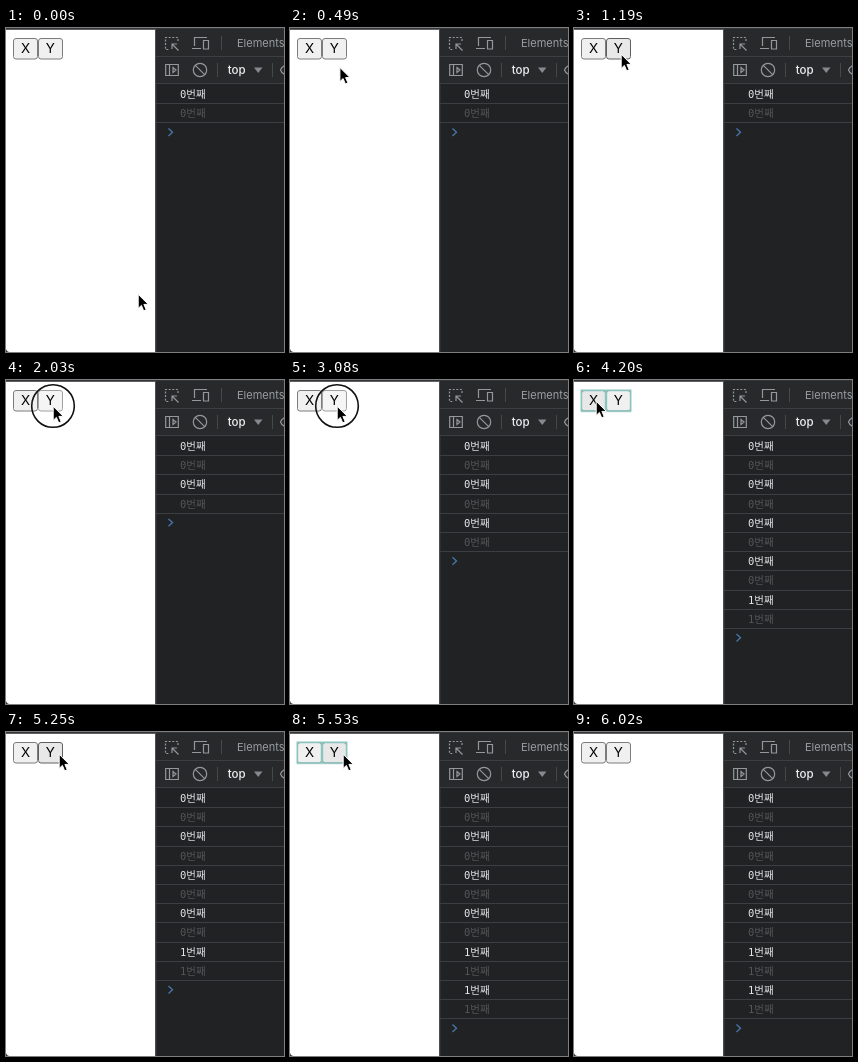
An HTML page that plays this animation: 278 px wide and 324 px high, repeating every 7 s.

```html
<!DOCTYPE html>
<html lang="ko">
<head>
<meta charset="utf-8">
<title>Render log</title>
<style>
html, body { margin: 0; width: 100%; height: 100%; overflow: hidden; background: #202224; }
svg { display: block; width: 278px; height: 324px; }
.ui { font: 11px Inter, Roboto, sans-serif; }
.btn rect { fill: #f0f0f0; stroke: #7c7c7c; }
.btn text { font: 13.4px Inter, Arial, sans-serif; text-anchor: middle; fill: #000; }
.btn.hover rect { fill: #e8e8e8; stroke: #606060; }
.btn.active rect { fill: #f5f5f5; stroke: #a0a0a0; }
.log { font: 10.5px "DejaVu Sans Mono", "Noto Sans CJK KR", "Noto Sans CJK", monospace; fill: #e4e6e8; }
.dim { fill: #535557; }
.line { stroke: #3c3f42; }
.icon { fill: none; stroke: #94989c; stroke-width: 1.2; }
</style>
</head>
<body>
<svg viewBox="0 0 278 324">
  <rect width="278" height="324" fill="#202224"/>
  <rect y="1.5" width="149" height="322.5" fill="#fff"/>
  <rect width="278" height="1.5" fill="#333437"/>
  <path d="M0 321V324H3Q0.5 323.5 0 321Z" fill="#333"/>
  <rect x="149" y="1" width="1.3" height="323" fill="#4a4c4e"/>

  <rect x="150.3" y="1.5" width="128" height="54" fill="#27292b"/>
  <path class="line" d="M150 28.5H278M150 55.5H278"/>
  <path stroke="#46494c" d="M215.5 8V22M211.5 35V49M266.5 35V49"/>
  <path class="icon" stroke-dasharray="2 1.6" d="M172 13V9.5H159.5V21.5H164"/>
  <path class="icon" d="M172.5 22.5L166 16M166 21V16H171"/>
  <path class="icon" d="M188.5 18V9.5H201M186 20.5H195M197.5 12.5H202.5V21H197.5Z"/>
  <text class="ui" x="231" y="19.3" fill="#9a9ea2">Elements</text>
  <path class="icon" d="M159.7 36.5H172.3V47.5H159.7ZM163.5 36.5V47.5M167 39.5L170 42L167 44.5Z"/>
  <circle class="icon" cx="194" cy="42" r="6.7"/>
  <path class="icon" d="M189.3 37.3L198.7 46.7"/>
  <text class="ui" x="221.7" y="46" fill="#eceef0" style="font-size:11.5px;font-weight:500">top</text>
  <path d="M248 39.5H256.5L252.2 45Z" fill="#85898d"/>
  <path class="icon" d="M279 37.5Q275.5 39 274.5 42Q275.5 45 279 46.5"/>

  <g id="logs"></g>
  <path id="prompt" d="M162.5 -3.7L166.5 0L162.5 3.7" fill="none" stroke="#4877ad" stroke-width="1.3"/>

  <g class="btn" id="bx"><rect x="7.5" y="10.5" width="24" height="20.5" rx="2.5"/><text x="19.5" y="25.3">X</text></g>
  <g class="btn" id="by"><rect x="32.5" y="10.5" width="24" height="20.5" rx="2.5"/><text x="44.3" y="25.3">Y</text></g>
  <g id="flash" fill="none">
    <path stroke="#d9ebe9" d="M6.5 9.5H57.5V32H6.5Z"/>
    <path stroke="#8cc5bf" stroke-width="1.4" d="M7.5 10.5H31.5V31H7.5ZM32.5 10.5H56.5V31H32.5Z"/>
  </g>
  <g id="cursor">
    <circle id="ring" r="21.3" fill="none" stroke="#111" stroke-width="1.6"/>
    <path d="M.2 .3V14.4L3.4 11.4L5.7 16.8L8.2 15.7L5.9 10.4H10.3Z" fill="#000" stroke="#fff" stroke-width="1" stroke-linejoin="round"/>
  </g>
</svg>
<script>
const LOOP = 7000, STEP = 70, ROW = 19.2, TOP = 56;
const $ = id => document.getElementById(id);

// time, x, y of the pointer tip
const path = [
  [0, 132, 266], [560, 46, 29], [1120, 46, 29], [1190, 47, 26],
  [3360, 47, 26], [3570, 37, 23], [3710, 37, 23], [3850, 22, 21],
  [4830, 22, 21], [5040, 54, 25], [5180, 54, 25], [5250, 53, 22],
  [5880, 53, 22], [5950, 78, 52]
];
// press time, release time, logged count (none for the focusing click)
const clicks = [
  [630, 770, null], [1260, 1470, 0], [2030, 2170, 0],
  [3080, 3290, 0], [4060, 4200, 1], [5320, 5530, 1]
];
const renders = [[0, 0, 0], ...clicks.filter(c => c[2] !== null)];
const FLASH = 280, HOVER_ON = 980, HOVER_OFF = 5950, LEAVE = 6020;

const pairs = renders.map(([, , count], i) => {
  let html = "";
  for (let k = 0; k < 2; k++) {
    const y = TOP + (2 * i + k) * ROW;
    const edge = Math.round(y + ROW) + 0.5;
    html += `<text class="log${k ? " dim" : ""}" x="174" y="${y + 13.9}">${count}번째</text>` +
            `<path class="line" d="M150 ${edge}H278"/>`;
  }
  const g = document.createElementNS("http://www.w3.org/2000/svg", "g");
  g.innerHTML = html;
  $("logs").append(g);
  return g;
});

function pointAt(t) {
  const i = path.findIndex(p => p[0] > t);
  if (i < 0) return path[path.length - 1].slice(1);
  const [t0, x0, y0] = path[i - 1], [t1, x1, y1] = path[i];
  const p = (t - t0) / (t1 - t0), e = p * p * (3 - 2 * p);
  return [x0 + (x1 - x0) * e, y0 + (y1 - y0) * e];
}

const show = (el, on) => { el.style.display = on ? "" : "none"; };

function draw(now) {
  const t = Math.floor((now % LOOP) / STEP) * STEP;
  const [x, y] = pointAt(t);
  const pressed = clicks.some(([on, off]) => t >= on && t < off);
  const hovering = t >= HOVER_ON && t < HOVER_OFF;
  const target = x > 32 ? "by" : "bx";

  $("cursor").setAttribute("transform", `translate(${x} ${y})`);
  show($("cursor"), t < LEAVE);
  show($("ring"), pressed);
  for (const id of ["bx", "by"]) {
    const own = id === target;
    $(id).classList.toggle("hover", own && hovering && !pressed);
    $(id).classList.toggle("active", own && hovering && pressed);
  }

  let count = 0;
  renders.forEach(([, at], i) => {
    const on = t >= at;
    show(pairs[i], on);
    if (on) count++;
  });
  const last = renders[count - 1][1];
  show($("flash"), count > 1 && t < last + FLASH);
  $("prompt").setAttribute("transform", `translate(0 ${TOP + 2 * count * ROW + 9.8})`);
}

const start = performance.now();
function tick() {
  draw(performance.now() - start);
  requestAnimationFrame(tick);
}
tick();
</script>
</body>
</html>
```
